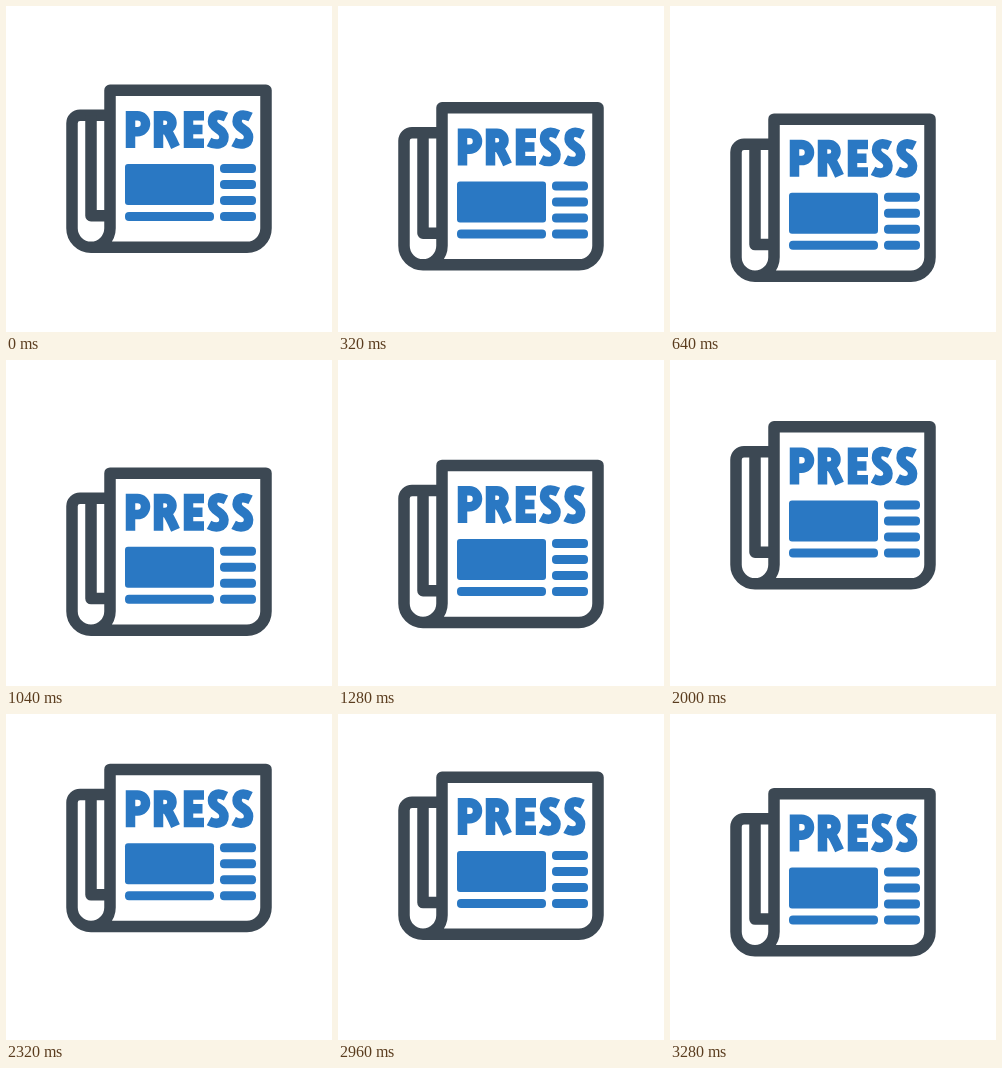
These frames come from a looping animation (326x326 px, 3360 ms). An HTML page:

```html
<!DOCTYPE html>
<html lang="en">
<head>
<meta charset="utf-8">
<title>Press</title>
<style>
  html, body { margin: 0; width: 100%; height: 100%; overflow: hidden; background: #fff; }
  svg { display: block; width: 100vw; height: 100vh; }
  .frame, .word { fill: none; }
  .frame { stroke: #3c4853; stroke-width: 11.5; stroke-linejoin: round; }
  .word { stroke: #2a78c3; stroke-width: 9.5; }
  .columns { fill: #2a78c3; }
</style>
</head>
<body>
<svg viewBox="0 0 326 326">
  <defs>
    <path id="s" d="M220 111C213 107.5 206.5 108 206.500 115.500C206.500 123 218 122.500 218 131C218 139 209.500 139.500 203 136"/>
  </defs>
  <g id="paper">
    <g class="frame">
      <path d="M85 241.300A19 19 0 0 0 104 222.300V84.300H260V222.300A19 19 0 0 1 241 241.300H85A19 19 0 0 1 66 222.300V117.300A8 8 0 0 1 74 109.300H104"/>
      <path d="M85 109.300V209.700H104"/>
    </g>
    <g class="word" role="img" aria-label="PRESS">
      <path d="M124.500 142V109.750H131.500a8 8 0 0 1 0 16H125"/>
      <path d="M152.500 142V109.750H159a7 7 0 0 1 0 14H153M159 122Q163 126 169.500 141"/>
      <path d="M198 109.750H182.500V137.250H198M182.500 123.500H196.500"/>
      <use href="#s"/>
      <use href="#s" x="24.600"/>
    </g>
    <g class="columns">
      <rect x="119" y="158" width="89" height="41" rx="3"/>
      <rect x="119" y="206" width="89" height="9" rx="4"/>
      <rect x="214" y="158" width="36" height="9" rx="4"/>
      <rect x="214" y="174" width="36" height="9" rx="4"/>
      <rect x="214" y="190" width="36" height="9" rx="4"/>
      <rect x="214" y="206" width="36" height="9" rx="4"/>
    </g>
  </g>
</svg>
<script>
  const LOOP = 3360, STEP = 80, SWING = 31;
  const paper = document.getElementById('paper');
  const start = performance.now();

  // The paper bobs on a sine wave, moving once per step.
  function draw() {
    const time = Math.floor((performance.now() - start) / STEP) * STEP % LOOP;
    const y = SWING * Math.sin(2 * Math.PI * time / LOOP);
    paper.setAttribute('transform', `translate(0 ${y.toFixed(2)})`);
    requestAnimationFrame(draw);
  }
  draw();
</script>
</body>
</html>
```
